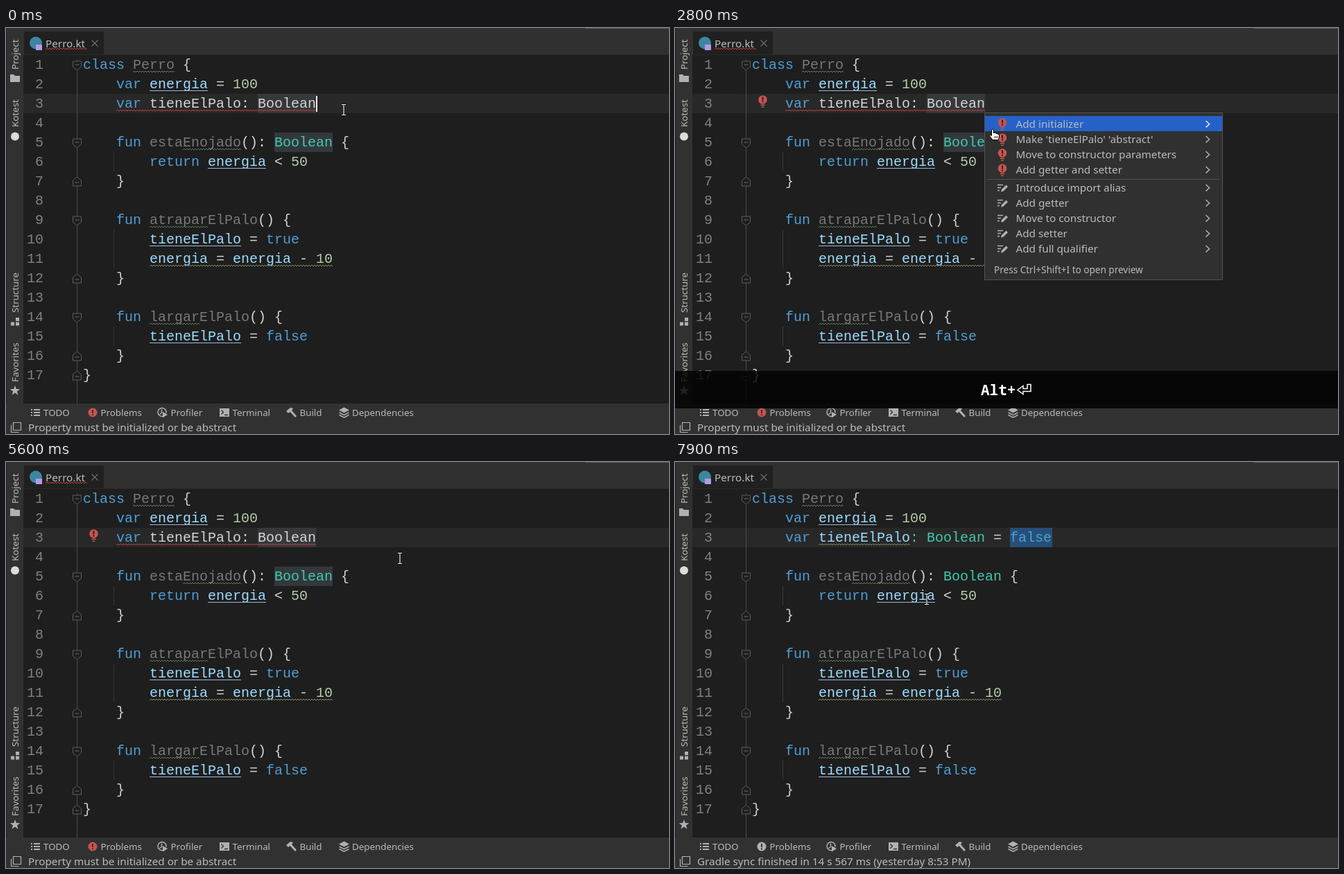
These frames come from a looping animation (956x586 px, 8000 ms). An HTML page:

```html
<!DOCTYPE html>
<html lang="es">
<head>
<meta charset="utf-8">
<title>Editor</title>
<style>
  html, body { margin: 0; width: 100%; height: 100%; overflow: hidden; background: #1e1e1e; }
  svg { display: block; }
  text { white-space: pre; }
  .code { font: 20px "Liberation Mono", monospace; fill: #d4d4d4; }
  .num { fill: #808080; text-anchor: end; }
  .ui { font: 15.25px "Noto Sans", "Open Sans", sans-serif; fill: #bbbbbb; }
  .small { font-size: 13.33px; }
  .hint { font-size: 13.56px; }
  .keys { font: bold 21px "Noto Sans Mono", "DejaVu Sans Mono", monospace; fill: #fff; }
  .k { fill: #4f9ed6; }
  .c { fill: #40c8ae; }
  .u { fill: #787878; }
  .v, .w { fill: #9cdcfe; }
  .n { fill: #b5cea8; }
</style>
</head>
<body>
<svg id="stage" width="956" height="586" viewBox="0 0 956 586"></svg>
<script>
const LOOP = 8000, CHAR = 12.002, LEFT = 111, ROW = 28, GREY = "#afb1b3";
const rowTop = n => 39 + ROW * (n - 1);
const baseline = n => rowTop(n) + 20;
const colX = col => LEFT + col * CHAR;

const rect = (x, y, w, h, fill, more = "") =>
  `<rect x="${x}" y="${y}" width="${w}" height="${h}" fill="${fill}" ${more}/>`;
const circle = (x, y, r, fill) => `<circle cx="${x}" cy="${y}" r="${r}" fill="${fill}"/>`;
const path = (d, more) => `<path d="${d}" ${more}/>`;
const solid = (d, color = GREY) => path(d, `fill="${color}"`);
const stroke = (d, width = 1.3, color = GREY) =>
  path(d, `fill="none" stroke="${color}" stroke-width="${width}"`);
const label = (x, y, str, cls = "", more = "") =>
  `<text x="${x}" y="${y}" class="ui ${cls}" ${more}>${str}</text>`;
const group = (id, body) => `<g id="${id}">${body}</g>`;
const wave = (x1, x2, y, color) =>
  stroke(`M${x1} ${y + 2}` + "l2 -2l2 2".repeat(Math.round((x2 - x1) / 4)), 1, color);
const waveCols = (n, from, to, color) => wave(colX(from), colX(to), baseline(n) + 3, color);

// Tokens are split by "|"; the first letter of each is its colour class.
function codeLine(n, col, source) {
  let spans = "", lines = "", at = col;
  for (const token of source.split("|")) {
    const str = token.slice(1), cls = token[0];
    spans += `<tspan class="${cls}">${str.replace("<", "&lt;")}</tspan>`;
    if (cls === "v")
      lines += rect(Math.round(colX(at)), baseline(n) + 3, str.length * 12, 1, "#9cb8d8");
    at += str.length;
  }
  return `<text class="code" x="${colX(col)}" y="${baseline(n)}">${spans}</text>${lines}`;
}

const program = [
  [1, 0, "kclass|t |uPerro|t {"],
  [2, 4, "kvar|t |venergia|t = |n100"],
  [5, 4, "kfun|t |uestaEnojado|t(): |cBoolean|t {"],
  [6, 8, "kreturn|t |venergia|t < |n50"],
  [7, 4, "t}"],
  [9, 4, "kfun|t |uatraparElPalo|t() {"],
  [10, 8, "vtieneElPalo|t = |ktrue"],
  [11, 8, "wenergia|t = |wenergia|t - |n10"],
  [12, 4, "t}"],
  [14, 4, "kfun|t |ulargarElPalo|t() {"],
  [15, 8, "vtieneElPalo|t = |kfalse"],
  [16, 4, "t}"],
  [17, 0, "t}"]
];

function fold(n, dir) {
  const y = rowTop(n) + 15;
  return path(`M96.5 ${y - 6 * dir}h12v${8 * dir}l-6 ${5 * dir}l-6 ${-5 * dir}z`,
      'fill="#1e1e1e" stroke="#5c5c5c"') +
    rect(99.5, y - .5 - dir, 6, 1, "#6a6a6a");
}

function bulb(x, y) {
  return circle(x, y - 2, 6.3, "#c75450") +
    rect(x - 1, y - 6, 2, 5, "#2b2020") + rect(x - 1, y, 2, 2, "#2b2020") +
    rect(x - 3, y + 5, 6, 1.6, "#c75450") + rect(x - 2, y + 8, 4, 1.3, "#c75450");
}

const pencil = y =>
  stroke(`M465 ${y - 4}h8M465 ${y}h5M465 ${y + 4}h3`, 1.6) +
  solid(`M470 ${y + 6}l1 -3.5l6.5 -6.5l2.5 2.5l-6.5 6.5z`);

const badge = color => circle(125, 555, 6.5, color) +
  rect(124, 551, 2, 5, "#303030") + rect(124, 557.3, 2, 2, "#303030");

function sidebar() {
  const side = (y, str) => label(0, 0, str, "small", `transform="translate(18 ${y}) rotate(-90)"`);
  let squares = "";
  for (const [x, y] of [[14, 418], [7, 424.5], [14, 424.5]]) squares += rect(x, y, 5, 5, GREY);
  let star = "";
  for (let i = 0; i < 10; i++) {
    const r = i % 2 ? 3.1 : 7.6, a = Math.PI * (i / 5 - .5);
    star += `${i ? "L" : "M"}${13 + r * Math.cos(a)} ${523.5 + r * Math.sin(a)}`;
  }
  return rect(0, 0, 25, 542, "#313131") + rect(0, 0, 1, 586, "#1c1c1c") +
    side(60, "Project") + side(143, "Kotest") + side(411, "Structure") + side(511, "Favorites") +
    solid("M6 67h5l2 2h7v9h-14z") + circle(13, 156.5, 6, "#dcdcdc") +
    squares + solid(star + "z");
}

function tabs() {
  return rect(25, 0, 931, 39, "#303030") + rect(835, 0, 121, 1, "#5c5c5c") +
    rect(26, 5, 115, 34, "#202020") + rect(25, 38, 931, 1, "#292929") +
    circle(43, 21.5, 9, "#3e86a0") + rect(43, 24, 9, 8, "#b49ae8") +
    label(57, 27.5, "Perro.kt") + stroke("M123.5 17.5l9 9m0 -9l-9 9", 1.1, "#6e6e6e");
}

function bottomBar() {
  const names = [[54, "TODO"], [136.5, "Problems"], [237.5, "Profiler"],
    [326.5, "Terminal"], [423.5, "Build"], [499, "Dependencies"]];
  return rect(0, 542, 956, 44, "#313131") +
    names.map(([x, str]) => label(x, 560, str, "small")).join("") +
    stroke("M36 551h2M40 551h9M36 555h2M40 555h9M36 559h2M40 559h9", 2) +
    stroke("M226 560.5a6 6 0 1 1 5 -5M224.5 550.5v5l-3 2", 1.5) +
    solid("M226 554l7 4l-7 4.5z") +
    rect(308, 549, 14, 12, GREY) +
    stroke("M310.5 551.5l3 3l-3 3M315 558.5h5", 1.4, "#313131") +
    solid("M404 553l6 -5l4 1l-2 3l7 8l-2 2l-7.5 -8l-2.5 2z") +
    solid("M480 551.5l7.5 -4l7.5 4l-7.5 4z") +
    stroke("M480.5 555l7 3.7l7 -3.7M480.5 558.5l7 3.7l7 -3.7", 1.6) +
    stroke("M10.5 569.5h11v11h-11zM7.5 573v10.5h11", 1.2);
}

function gutter() {
  let out = rect(102, 45, 1, 497, "#4a4a4a");
  for (let n = 1; n <= 17; n++)
    out += `<text class="code num" x="54" y="${baseline(n)}">${n}</text>`;
  for (const n of [1, 5, 9, 14]) out += fold(n, 1);
  for (const n of [7, 12, 16, 17]) out += fold(n, -1);
  for (const [n, count] of [[6, 1], [10, 2], [15, 1]])
    out += rect(155, rowTop(n), 1, ROW * count, "#383838");
  return out;
}

function menu() {
  const items = ["Add initializer", "Make 'tieneElPalo' 'abstract'", "Move to constructor parameters",
    "Add getter and setter", "Introduce import alias", "Add getter", "Move to constructor",
    "Add setter", "Add full qualifier"];
  let out = rect(446.5, 122.5, 343, 241, "#303030", 'stroke="#535353"') +
    rect(447, 127, 342, 22, "#2561c7") + rect(450, 218, 336, 1, "#515151");
  items.forEach((str, i) => {
    const y = 138.5 + 22 * i + (i > 3 ? 4 : 0);
    out += (i < 4 ? bulb(472, y) : pencil(y)) + label(491.5, y + 5, str) +
      stroke(`M765.5 ${y - 4.5}l5 4.7l-5 4.7`, 1.5, i ? GREY : "#e4e8f0");
  });
  return out + label(460, 354, "Press Ctrl+Shift+I to open preview", "hint");
}

const keyBar = () => rect(0, 495, 956, 54, "#000", 'opacity=".81"') +
  '<text class="keys" x="441" y="530">Alt+</text>' +
  stroke("M508 514.5h5v10h-11v4l-8 -6l8 -6v4h6z", 1.5, "#fff") +
  group("recent", rect(441, 533, 73, 2, "#fff"));

const beamShape = "M-3 -7.5h2.5l.5 .5l.5 -.5h2.5M0 -7v14M-3 7.5h2.5l.5 -.5l.5 .5h2.5";
const beam = `<g opacity=".55">${stroke(beamShape, 2.4, "#000")}</g>` + stroke(beamShape, 1.2, "#f4f4f4");
const hand = path("M-1.5 1q1.5 -2 3 0v5l1 -1l2 .5l.5 .7l2 .3l.5 .8l2 .7v4l-1.5 3.5h-8l-4.5 -6q0 -2.2 3 0z",
  'fill="#fff" stroke="#000"') + stroke("M3 10v3M5 10v3M7 10v3", .8, "#000");

document.getElementById("stage").innerHTML =
  rect(0, 0, 956, 586, "#1e1e1e") + tabs() + rect(25, 95, 931, 28, "#282828") + gutter() +
  group("usages", rect(363, 95, 84, 28, "#36383b") + rect(387, 151, 84, 28, "#33383c")) +
  program.map(args => codeLine(...args)).join("") +
  waveCols(1, 6, 11, "#6c7a62") + waveCols(5, 12, 19, "#5f7d58") +
  waveCols(9, 8, 15, "#5f7d58") + waveCols(14, 8, 14, "#5f7d58") + waveCols(11, 8, 30, "#8f8c68") +
  group("before", codeLine(3, 4, "kvar|t tieneElPalo: Boolean")) +
  group("inserted", rect(483, 95, 61, 28, "#264f78") + codeLine(3, 29, "t= |kfalse")) +
  group("after", codeLine(3, 4, "kvar|t |wtieneElPalo|c: Boolean") + waveCols(3, 8, 19, "#7f8a62")) +
  group("errors", waveCols(3, 4, 28, "#c0413d") + wave(57, 115, 29, "#c0413d")) +
  group("bulb", bulb(126.5, 105.5)) +
  group("caret", rect(0, 98, 2, 23, "#e8e8e8")) +
  sidebar() + bottomBar() +
  group("badgeRed", badge("#c75450")) + group("badgeGrey", badge(GREY)) +
  group("statusError", label(32, 581.5, "Property must be initialized or be abstract")) +
  group("statusSync", label(32, 581.5, "Gradle sync finished in 14 s 567 ms (yesterday 8:53 PM)")) +
  group("menu", menu()) + group("keyBar", keyBar()) +
  group("beam", beam) + group("hand", hand);

// Visible spans in ms for each part.
const INSERT = 6100, CHECKED = 6400;
const spans = {
  caret: [[0, 300], [800, 1300], [INSERT, 6600], [7100, 7600]],
  bulb: [[200, INSERT]],
  menu: [[1500, 5600]],
  keyBar: [[1500, 4300]],
  recent: [[1500, 1700]],
  hand: [[2800, 5600]],
  beam: [[0, 2800], [5600, LOOP]],
  inserted: [[INSERT, LOOP]],
  usages: [[0, CHECKED]],
  before: [[0, CHECKED]],
  errors: [[0, CHECKED]],
  badgeRed: [[0, CHECKED]],
  statusError: [[0, CHECKED]],
  after: [[CHECKED, LOOP]],
  badgeGrey: [[CHECKED, LOOP]],
  statusSync: [[CHECKED, LOOP]]
};

// Pointer hot spot: time, x, y.
const track = [
  [0, 487, 118], [2700, 487, 118], [2800, 458, 146], [2900, 459, 149], [3300, 459, 149],
  [3700, 509.5, 139], [3900, 509.5, 139], [4100, 516.5, 139], [4300, 516.5, 139],
  [5000, 567, 136], [5500, 567, 136], [5600, 568, 139], [6100, 568, 139], [6700, 529, 181],
  [6900, 527, 181], [7000, 515, 160], [7200, 455, 85], [7400, 370, 45], [7600, 300, 65],
  [7800, 273, 110], [7900, 363, 198], [8000, 363, 198]
];

function pointerAt(t) {
  const i = track.findIndex(key => key[0] > t);
  const [t0, x0, y0] = track[i - 1], [t1, x1, y1] = track[i];
  const f = (t - t0) / (t1 - t0);
  return [x0 + (x1 - x0) * f, y0 + (y1 - y0) * f];
}

const el = id => document.getElementById(id);
const parts = Object.entries(spans).map(([id, list]) => [el(id), list]);

function draw(now) {
  const t = Math.floor(now % LOOP / 100) * 100;
  for (const [node, list] of parts)
    node.style.display = list.some(([from, to]) => t >= from && t < to) ? "" : "none";
  const place = `translate(${pointerAt(t).join(" ")})`;
  el("beam").setAttribute("transform", place);
  el("hand").setAttribute("transform", place);
  el("caret").setAttribute("transform", `translate(${t < INSERT ? 447 : 543} 0)`);
}

const start = performance.now();
function tick() {
  draw(performance.now() - start);
  requestAnimationFrame(tick);
}
tick();
</script>
</body>
</html>
```
